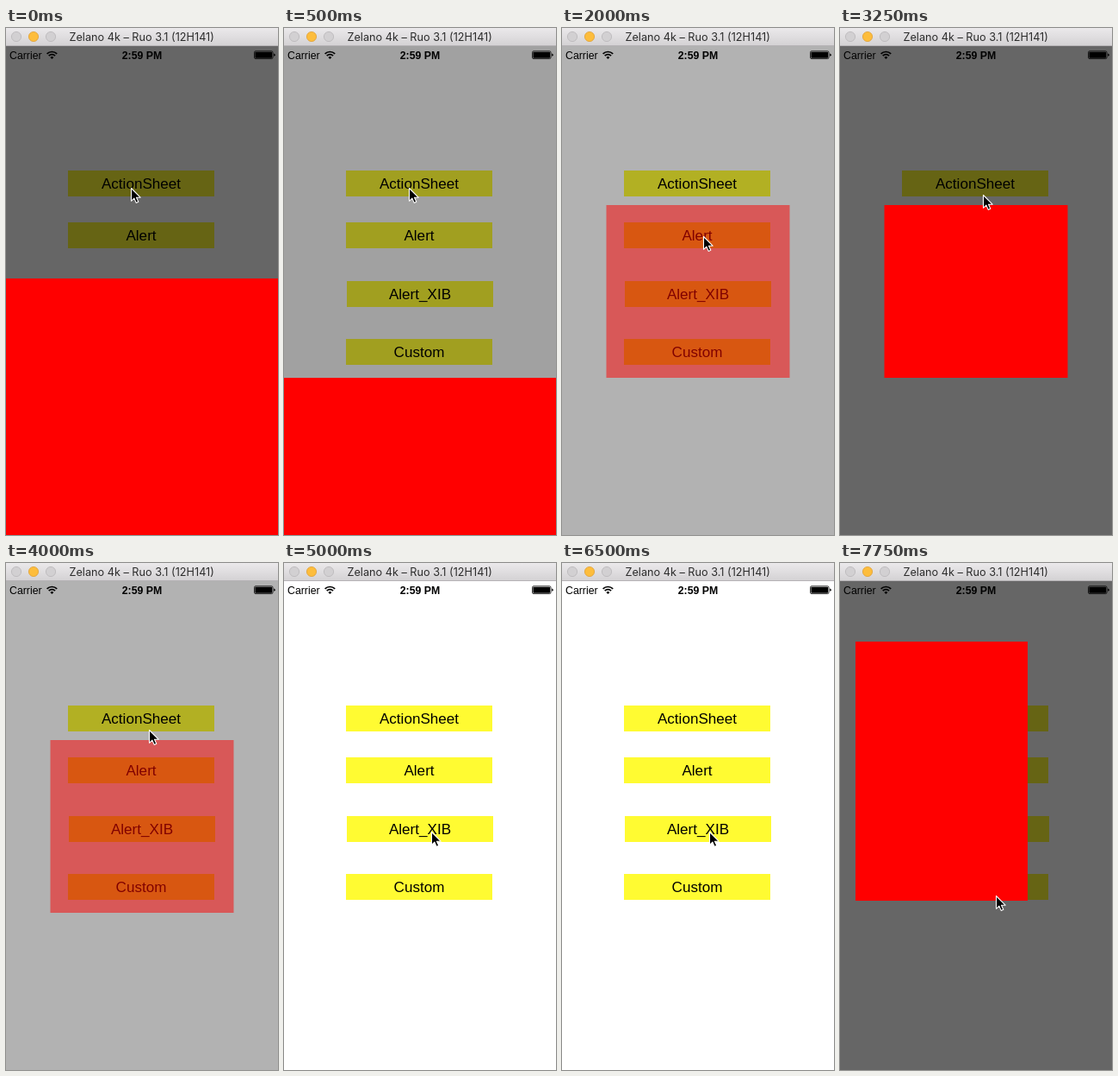
Animation, 316 px wide and 587 px high, one loop 8 s. Source, as an HTML page:

```html
<!DOCTYPE html>
<html lang="en">
<head>
<meta charset="utf-8">
<title>Popup demo</title>
<style>
  html, body { margin: 0; width: 100%; height: 100%; overflow: hidden; background: #fff; }
  svg { display: block; width: 100%; height: 100%; }
  text { font-family: "Liberation Sans", Arial, sans-serif; }
  .bar { font: 12.7px Inter, Roboto, sans-serif; fill: #2c2c2c; }
  .status { font-size: 12.3px; }
  .bold { font-weight: bold; }
  .button { font-size: 17.1px; }
  .mid { text-anchor: middle; }
</style>
</head>
<body>
<svg viewBox="0 0 316 587" xmlns="http://www.w3.org/2000/svg">
  <defs>
    <linearGradient id="chrome" x2="0" y2="1">
      <stop offset="0" stop-color="#ebe9eb"/>
      <stop offset="1" stop-color="#d3d1d3"/>
    </linearGradient>
  </defs>
  <rect width="316" height="587" fill="#fff"/>

  <text class="status" x="4" y="35.5">Carrier</text>
  <g fill="none" stroke="#000" stroke-width="1.7">
    <path d="M47.6 29.9a8.2 8.2 0 0 1 11.6 0M49.7 32.2a5.2 5.2 0 0 1 7.4 0"/>
    <path d="M53.4 36l-2-2.1a2.8 2.8 0 0 1 4 0z" fill="#000" stroke="none"/>
  </g>
  <text class="status bold mid" x="158" y="35.5">2:59 PM</text>
  <rect x="288.5" y="26.8" width="21.5" height="8.8" rx="1.5" fill="#fff" stroke="#000" stroke-width=".8"/>
  <rect x="289.4" y="27.7" width="19.7" height="7" rx=".7"/>
  <path d="M311.2 29.6q1.5.3 1.5 1.6t-1.5 1.6z"/>

  <g id="buttons"></g>
  <rect id="dim" y="21" width="316" height="566"/>
  <rect id="panel"/>

  <rect width="316" height="21" fill="url(#chrome)"/>
  <rect y="20" width="316" height="1" fill="#b5b2b5"/>
  <g fill="#d2d0d2" stroke="#b9b7b9" stroke-width=".8">
    <circle cx="12" cy="10" r="5.6"/>
    <circle cx="32" cy="10" r="5.6" fill="#fdbd3c" stroke="#e0a034"/>
    <circle cx="52" cy="10" r="5.6"/>
  </g>
  <text class="bar mid" x="157.7" y="15">Zelano 4k – Ruo 3.1 (12H141)</text>

  <path id="cursor" d="M.5.5V15.3L3.9 12.2 6.2 17.4 8.8 16.3 6.5 11.2H11.1Z"
        stroke="#fff" stroke-width="1.1" stroke-linejoin="round"/>
</svg>
<script>
const LOOP = 8000;
const el = id => document.getElementById(id);
const setAll = (node, attrs) => {
  for (const key in attrs) node.setAttribute(key, attrs[key]);
};

const buttons = [
  ["ActionSheet", 72, 165],
  ["Alert", 72, 225],
  ["Alert_XIB", 73, 293],
  ["Custom", 72, 360]
];
el("buttons").innerHTML = buttons.map(([label, x, y]) =>
  `<rect x="${x}" y="${y}" width="170" height="30" fill="#fffb32"/>
   <text class="button mid" x="${x + 85}" y="${y + 20.7}">${label}</text>`).join("");

const panels = {
  sheet: { x: 0, y: 290, width: 316, height: 297, fill: "#f00" },
  alert: { x: 51.5, y: 205, width: 213, height: 200, fill: "#f00" },
  xib: { x: 59.5, y: 205, width: 197, height: 200, fill: "#aeffff" },
  custom: { x: 18, y: 91, width: 200, height: 300, fill: "#f00" }
};

// time, panel, dim, panel opacity, downward shift
const popupSteps = [
  [0, "sheet", .6, 1, 0],
  [500, "sheet", .37, 1, 115],
  [750, "sheet", 0, 0, 297],
  [2000, "alert", .3, .5, 0],
  [2250, "alert", .6, 1, 0],
  [4000, "alert", .3, .5, 0],
  [4250, "alert", 0, 0, 0],
  [5250, "xib", .28, .5, 0],
  [5500, "xib", .54, .98, 0],
  [6250, "xib", .55, 1, 0],
  [6500, "xib", 0, 0, 0],
  [7500, "custom", .3, .5, 0],
  [7750, "custom", .6, 1, 0]
];

// time, tip x, tip y
const cursorSteps = [
  [0, 145, 185], [1250, 160, 228], [1500, 164, 241],
  [2750, 166, 206], [3000, 166, 199], [3250, 166, 193],
  [4500, 163, 224], [4750, 171, 310], [5000, 171, 311],
  [6750, 172, 313], [7000, 178, 371], [7250, 181, 385]
];

const stepAt = (steps, t) => steps.findLast(step => step[0] <= t);

function draw(now) {
  const t = now % LOOP;
  const [, name, dim, opacity, shift] = stepAt(popupSteps, t);
  const [, x, y] = stepAt(cursorSteps, t);
  setAll(el("dim"), { opacity: dim });
  setAll(el("panel"), { ...panels[name], opacity, transform: `translate(0 ${shift})` });
  setAll(el("cursor"), { transform: `translate(${x} ${y})` });
}

const start = performance.now();
function tick() {
  draw(performance.now() - start);
  requestAnimationFrame(tick);
}
tick();
</script>
</body>
</html>
```
